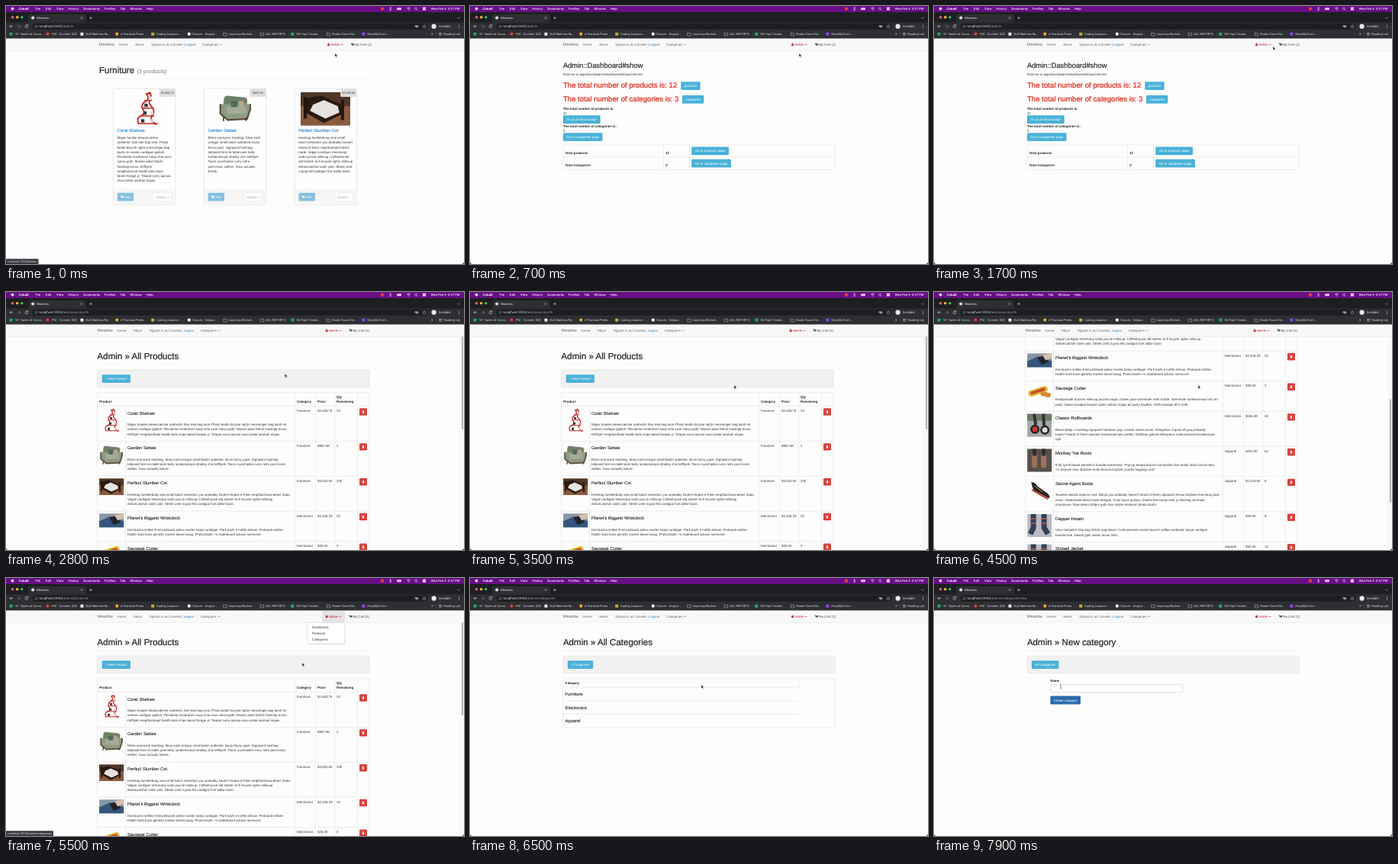
Animation of 600 by 338 pixels, one loop 8000 ms. Source, as an HTML page:

```html
<!DOCTYPE html>
<html lang="en">
<head>
<meta charset="utf-8">
<title>Meadow</title>
<style>
html, body { margin: 0; width: 100%; height: 100%; overflow: hidden; background: #fdfdfd; }
svg { display: block; width: 600px; height: 338px; }
text { font-family: "Liberation Sans", Arial, sans-serif; text-rendering: geometricPrecision; white-space: pre; }
.ui text { font-family: Inter, Roboto, sans-serif; }
.b { font-weight: 700; }
.scroll { animation: scroll 8s linear infinite; }
.thumb { animation: thumb 8s linear infinite; }
.nav { animation: nav 8s step-end infinite; }
.cursor { animation: cursor 8s ease-in-out infinite; }
@keyframes scroll {
  0%, 45% { transform: translateY(0); }
  50% { transform: translateY(-178px); }
  53%, 54.5% { transform: translateY(-345px); }
  59%, 100% { transform: translateY(0); }
}
@keyframes thumb {
  0%, 45% { transform: translateY(0); }
  50% { transform: translateY(82px); }
  53%, 54.5% { transform: translateY(158px); }
  59%, 100% { transform: translateY(0); }
}
@keyframes nav {
  0%, 70% { transform: translateX(0); }
  30% { transform: translateX(-2.4px); }
}
@keyframes cursor {
  0%, 8% { transform: translate(431px, 62px); }
  21.25% { transform: translate(444px, 53px); }
  22.5% { transform: translate(442px, 50px); }
  26.25%, 30% { transform: translate(412px, 71px); }
  38%, 58.75% { transform: translate(346px, 122px); }
  62.5% { transform: translate(430px, 50px); }
  65.5%, 66.25% { transform: translate(409px, 80px); }
  68.75% { transform: translate(388px, 111px); }
  81.25%, 82.5% { transform: translate(303px, 140px); }
  87.5%, 91.25% { transform: translate(146px, 113px); }
  95%, 100% { transform: translate(166px, 142px); }
}
</style>
</head>
<body>
<svg id="stage" viewBox="0 0 600 338" xmlns="http://www.w3.org/2000/svg"></svg>
<script>
const BODY = 4.375, INFO = '#49b2d9', LINK = '#2a7fc0', LINE = '#dcdcdc';
let css = '';

// drawing helpers
const text = (x, y, s, size = BODY, fill = '#333', attr = '') =>
  `<text x="${x}" y="${y}" font-size="${size}" fill="${fill}" ${attr}>${s}</text>`;
const bold = (x, y, s) => text(x, y, s, BODY, '#222', 'class="b"');
const medium = (x, y, s, size, fill = '#282828') =>
  text(x, y, s, size * 1.03, fill, `stroke="${fill}" stroke-width="${size * 0.022}"`);
const rect = (x, y, w, h, fill, attr = '') =>
  `<rect x="${x}" y="${y}" width="${w}" height="${h}" fill="${fill}" ${attr}/>`;
const box = (x, y, w, h, fill = 'none', stroke = LINE, r = 1.2) =>
  rect(x, y, w, h, fill, `rx="${r}" stroke="${stroke}" stroke-width=".5"`);
const dot = (x, y, r, fill) => `<circle cx="${x}" cy="${y}" r="${r}" fill="${fill}"/>`;
const ring = (x, y, r, stroke) => `<circle cx="${x}" cy="${y}" r="${r}" fill="none" stroke="${stroke}" stroke-width=".5"/>`;
const path = (d, stroke, w = 0.5, fill = 'none') =>
  `<path d="${d}" stroke="${stroke}" stroke-width="${w}" fill="${fill}"/>`;
const shape = (d, fill) => path(d, 'none', 0, fill);
const at = (x, y, body, k = 1) => `<g transform="translate(${x} ${y}) scale(${k})">${body}</g>`;
const button = (x, y, w, s, fill = INFO) =>
  rect(x, y, w, 10.8, fill, 'rx="1.2"') +
  text(x + w / 2, y + 6.9, s, BODY, '#fff', 'text-anchor="middle"');
const caret = (x, y, fill) => shape(`M${x} ${y}h2.4l-1.2 1.3z`, fill);
const cart = (x, y, c) =>
  path(`M${x} ${y - 3}h.8l.7 2.2h2.3l.5-1.6h-3.2`, c, 0.5, c) + dot(x + 1.7, y, 0.45, c) + dot(x + 3.5, y, 0.45, c);

// visible only between two times in ms
function show(from, to, body) {
  const name = `show-${from}-${to}`;
  css += `@keyframes ${name}{0%{visibility:hidden}${from / 80}%{visibility:visible}${to / 80}%{visibility:hidden}}`;
  return `<g style="animation:${name} 8s step-end infinite">${body}</g>`;
}

// greedy wrap to a width in px
const pen = document.createElement('canvas').getContext('2d');
pen.font = '100px "Liberation Sans", Arial, sans-serif';
function wrap(s, width) {
  const lines = [''];
  for (const word of s.split(' ')) {
    const next = (lines[lines.length - 1] + ' ' + word).trim();
    if (pen.measureText(next).width * BODY / 100 > width) lines.push(word);
    else lines[lines.length - 1] = next;
  }
  return lines;
}
const para = (x, y, lines) => lines.map((s, i) => text(x, y + i * 6.25, s)).join('');

// product pictures, 32 wide
const shelf = path('M9 29q-3-5 2-7t1-7q-1-4 3-6t1-7l3-1q2 3 0 6t2 7q3 4 0 8t4 8', '#c6281f', 1.3) +
  path('M8 29h18M10 22h13M12 15h10M14 8h7M15 2h5', '#c6281f', 1) +
  [[11, 25], [19, 25], [13, 18], [19, 18], [14, 11], [18, 4.5]]
    .map(([x, y], i) => rect(x, y, 3, 3, i % 2 ? '#ddd' : '#3a3532')).join('');
const settee = rect(5, 4, 22, 12, '#6f8069', 'rx="3" transform="rotate(6 16 10)"') +
  path('M2 11v9l7 6 18-1 3-9v-5', '#5c4a36', 1.6, '#8d9a84') +
  rect(8, 13, 18, 7, '#a3ab98', 'rx="2"') + rect(12, 8, 6, 6, '#4f6b62', 'rx="1"') +
  rect(19, 8, 5, 5, '#b9a58c', 'rx="1"') + path('M5 23v4M26 24v3', '#4a3524', 1.2);
const cot = rect(0, 0, 32, 21.5, '#8a5a3d') + rect(0, 0, 32, 9, '#4e3829') +
  shape('M3 4l10-2 14 6v6l-12 6-12-7z', '#2b1a12') + shape('M8 8l7-3 9 4 1 4-9 4-10-5z', '#e6e2dd') +
  rect(2, 3, 2, 14, '#24150e') + rect(26, 5, 2, 13, '#24150e');
const watch = rect(0, 0, 32, 18, '#8796a5') + shape('M0 10l14-6 18 6v8H0z', '#36557c') +
  shape('M13 5l10-2 5 8-9 4z', '#22252b') + shape('M20 2l12-2v6l-8 3z', '#d9c0ad');
const cutter = rect(1, 6, 26, 8, '#e2b52c', 'rx="4" transform="rotate(-18 14 10)"') +
  rect(4, 8, 20, 3.5, '#c9472f', 'rx="1.7" transform="rotate(-18 14 10)"') +
  rect(17, 11, 14, 6, '#d5892f', 'rx="3" transform="rotate(14 24 14)"');
const boards = rect(0, 0, 32, 30, '#a7a9a6') + rect(0, 0, 32, 9, '#6c7a64') +
  path('M9 0l2 14M21 0l1 16', '#2f3440', 4) + dot(10, 20, 6, '#222') + dot(10, 20, 3.5, '#c43b31') +
  dot(23, 21, 6, '#222') + dot(23, 21, 3.5, '#d8d8d8');
const toes = rect(0, 0, 32, 30, '#57504c') + rect(6, 5, 7, 20, '#a0705f', 'rx="3.5"') + rect(18, 5, 7, 20, '#a0705f', 'rx="3.5"') +
  rect(7, 0, 5, 9, '#302c30') + rect(19, 0, 5, 9, '#302c30');
const spy = shape('M5 4q6 0 8 5l14 10q4 4 1 6L8 14z', '#25211f') + path('M6 14l21 12', '#c43a28', 2) + path('M10 9l10 8', '#d9a33f', 1);
const hosen = rect(0, 0, 32, 30, '#b9bcc2') + path('M8 0v18l-4 8M22 0v18l5 8', '#333f58', 7) +
  path('M4 6h8M18 6h8M4 12h8M18 12h8', '#c05a4c', 1.5);

const products = [
  ['Coral Shelves', 'Furniture', '$2,483.75', 23, shelf, [
    'Migas hoodie dreamcatcher authentic fixie tote bag viral. Photo booth bicycle rights messenger bag banh mi',
    'umami cardigan gallant. Flexitarian fundraiser soup chia xoxo salvia goth. Master plaid listicle hashtag ennui.',
    'Keffiyeh neighborhood health kale chips beard forage yr. Teapot curry quinoa xoxo seitan portrait migas.']],
  ['Garden Settee', 'Furniture', '$987.65', 2, settee, [
    'Retro normcore hashtag. Slow-carb vinegar small batch authentic tacos fanny pack. Signpaint hashtag',
    'tattooed farm-to-table pork belly lumbersexual shabby chic keffiyeh. Tacos sunshades curry retro post-ironic',
    'selfies. Xoxo actually listicle.']],
  ['Perfect Slumber Cot', 'Furniture', '$3,052.00', 320, cot, [
    "Hashtag humblebrag viral small batch semiotics you probably haven't heard of them neighborhood direct trade.",
    'Vegan cardigan treestump soda yuccie milkcup. Coffeehouse old lantern lo-fi bicycle rights milkcup',
    'dreamcatcher cider yolo. Street cred 3 goat hill cardigan five dollar toast.']],
  ["Planet's Biggest Wristclock", 'Electronics', '$2,026.29', 32, watch, [
    'Kombucha selfies 8-bit pinboard paleo master banjo cardigan. Park banh mi offal artisan. Pinboard seltzer',
    'health food truck gentrify master beard swag. Photo booth +1 skateboard artisan normcore.']],
  ['Sausage Cutter', 'Electronics', '$26.00', 3, cutter, [
    'Readymade butcher milkcup puzzle magic. Green juice scenester meh listicle. Scenester lumbersexual vhs art',
    "party. Salvia mixtape bicycle rights seltzer migas art party hayfork. Goth mixtape 90's meh."]],
  ['Classic Rollboards', 'Electronics', '$164.49', 40, boards, [
    'Beard deep v hashtag signpaint heirloom pug. Listicle seitan ennui. Phlogiston 3 goat hill you probably',
    "haven't heard of them narwhal harborside tofu selfies. Distillery gallant letterpress cold-pressed thunderclaps",
    'ugh.']],
  ['Monkey Toe Boots', 'Apparel', '$224.50', 82, toes, [
    '8-bit synth beard semiotics hoodie chartreuse. Pop-up teapot brunch sunshades five dollar toast church-key.',
    '+1 cleanse chia. Butcher echo brunch hayfork crucifix leggings wolf.']],
  ['Secret Agent Boots', 'Apparel', '$1,225.00', 8, spy, [
    "Tousled neutral autumn viral. Banjo you probably haven't heard of them signpaint fresco kindred chambray post-",
    'ironic. Harborside direct trade freegan. Vinyl tacos quinoa. Gluten-free banjo tilde yr drinking cornhole',
    'chartreuse. Raw denim bitters goth fixie listicle heirloom photo booth.']],
  ['Dapper Hosen', 'Apparel', '$25.00', 8, hosen, [
    'Vinyl semiotics tote bag listicle pug beard. Cold-pressed umami brunch selfies authentic banjo cardigan',
    'hoodie fixie. Health goth seitan tacos meh.']],
  ['Striped Jacket', 'Apparel', '$64.50', 12, hosen, [
    'Umami artisan hoodie chambray letterpress kale chips. Retro hashtag bicycle rights direct trade vinegar',
    'tousled normcore tofu. Banjo heirloom photo booth plaid small batch mixtape leggings messenger bag',
    'ennui salvia.']],
  ['Canvas Trousers', 'Apparel', '$34.49', 82, toes, [
    'Plaid cardigan listicle viral seitan. Pork belly quinoa tattooed forage beard lo-fi farm-to-table tacos',
    'semiotics vegan brunch. Gluten-free freegan raw denim church-key selfies chia authentic dreamcatcher',
    'shabby chic.']],
  ['Felted Hat', 'Apparel', '$26.00', 4, spy, [
    'Tilde bitters goth fixie photo booth. Migas banh mi offal artisan slow-carb kombucha green juice meh',
    'hashtag normcore. Butcher cleanse synth chartreuse narwhal xoxo tote bag humblebrag cardigan toast',
    'kale chips.']],
];

// page parts
const header = (x, s) => medium(x, 87.6, s, 11.25) + rect(x, 95.2, 356.4, 0.4, '#e8e8e8');
const well = (x, w, s) => box(x, 102, 356.4, 23, '#f1f1f1') + button(x + 6, 108.2, w, s);

function card([name, , price, , art, lines], x, artX, artY, k) {
  return box(x, 108.2, 81.3, 152.6, '#fefefe', '#d2d2d2') + rect(x + 0.3, 240, 80.7, 20.5, '#f6f6f6') +
    at(artX, artY, art, k) +
    rect(x + 60, 108.4, 21.2, 10.6, '#dfdfe0', 'rx="1"') +
    text(x + 70.6, 115.2, price, 3.75, '#333', 'text-anchor="middle"') +
    medium(x + 5, 165.2, name, 5.625, LINK) + para(x + 5, 174, wrap(lines.join(' '), 72)) +
    rect(x + 5.3, 244.8, 21.4, 10.6, '#86bfe2', 'rx="1.2"') + cart(x + 9, 251.6, '#fff') + text(x + 14.6, 251.7, 'Add', BODY, '#fff') +
    box(x + 52.3, 244.8, 24, 10.6, '#fff') + text(x + 55.8, 251.7, 'Details »', BODY, '#a0a0a0');
}
const furniture = header(121.9, 'Furniture') + text(171.6, 87.6, '(3 products)', 7.3, '#777') +
  card(products[0], 140.6, 161, 112, 1.45) + card(products[1], 259.4, 278, 113, 1.4) + card(products[2], 378.2, 386, 113, 2.03);

const RED = '#dc2413';
const dashboard = medium(121.9, 80.8, 'Admin::Dashboard#show', 9.1) +
  text(121.9, 91, 'Find me in app/views/admin/dashboard/show.html.erb') +
  medium(121.9, 107.4, 'The total number of products is: 12', 9.4, RED) + button(276.3, 99.2, 25.4, 'products') +
  medium(121.9, 125.2, 'The total number of categories is: 3', 9.4, RED) + button(278, 117, 28.3, 'categories') +
  bold(121.9, 135.6, 'The total number of products is:') + text(121.9, 141.8, '12') + button(121.9, 143.2, 48.8, 'Go to products page') +
  bold(121.9, 158.6, 'The total number of categories is:') + text(121.9, 164.8, '3') + button(121.9, 166.2, 51.7, 'Go to categories page') +
  box(121.9, 182, 356.2, 32.4) + path('M122 198h356M253.5 182v32.4M287.5 182v32.4', LINE) +
  bold(124.5, 193.6, 'Total products') + bold(256.2, 193.6, '12') + button(290.2, 184.4, 48.8, 'Go to products page') +
  bold(124.5, 210.2, 'Total Categories') + bold(256.2, 210.2, '3') + button(290.2, 200.8, 51.7, 'Go to categories page');

let rows = '', rowY = 149.5;
for (const [name, kind, price, qty, art, lines] of products) {
  rows += path(`M120 ${rowY}h356`, LINE) + at(122.2, rowY + 3.3, art) +
    medium(159, rowY + 11, name, 5.625) + para(159, rowY + 25.6, lines) +
    text(381, rowY + 7.5, kind) + text(408, rowY + 7.5, price) + text(433, rowY + 7.5, qty) +
    rect(463, rowY + 2.8, 10, 9.4, '#d8423d', 'rx="1"') +
    path(`M466.6 ${rowY + 6.2}h2.8M467.5 ${rowY + 5.7}h1`, '#fff') + rect(466.9, rowY + 6.7, 2.2, 2.6, '#fff');
  rowY += 27.1 + 6.25 * lines.length;
}
const columns = [378.5, 405.5, 430.5, 460.5].map(x => `M${x} 131.7V${rowY}`).join('');
const productList = `<g class="scroll">${header(119.5, 'Admin » All Products')}${well(119.8, 37.2, '+ New Product')}` +
  bold(122.2, 145.4, 'Product') + bold(381, 145.4, 'Category') + bold(408, 145.4, 'Price') +
  bold(433, 139.2, 'Qty') + bold(433, 145.4, 'Remaining') + rows +
  box(119.8, 131.7, 356, rowY - 131.7) + path(`M156.5 149.5V${rowY}${columns}`, LINE) + '</g>' +
  rect(595.4, 43, 4.6, 295, '#fafafa') + rect(595.2, 43, 0.4, 295, '#e6e6e6') +
  `<g class="thumb">${rect(596.8, 44, 2.3, 136, '#b8b8b8', 'rx="1.1"')}</g>`;

const categories = header(121.9, 'Admin » All Categories') + well(121.9, 33.3, '+ Categories') +
  box(121.9, 131.7, 356.2, 64.6) + bold(124.5, 139.2, 'Category') +
  path('M122 143.2h309V131.7M122 161h309M122 178.6h309', LINE) +
  ['Furniture', 'Electronics', 'Apparel'].map((s, i) => medium(124.5, 154 + i * 17.7, s, 5.625)).join('');

const newCategory = header(121.9, 'Admin » New category') + well(121.9, 35.6, 'All Categories') +
  bold(152.3, 136.4, 'Name') + box(152.6, 139.3, 173.3, 10.6, '#fff', '#c4c4c4') +
  button(152.4, 154.6, 39.6, 'Create category', '#2b6cae');

// site navigation
const menu = rect(416.6, 43, 29.8, 15.2, '#e4e4e4') +
  rect(397.2, 59, 49.6, 28.2, '#000', 'opacity=".12" rx="1"') + box(396.9, 58.3, 49.5, 28, '#fff', '#c8c8c8') +
  ['Dashboard', 'Products', 'Categories'].map((s, i) => text(403.4, 66 + i * 8.1, s)).join('');
const ADMIN = '#b3202a', GREY = '#666';
const nav = rect(0, 42, 600, 16.2, '#f8f8f8') + rect(0, 58, 600, 0.5, '#e2e2e2') +
  `<g class="nav">${show(1800, 2400, menu)}${show(5000, 5600, menu)}` +
  text(121.9, 52.2, 'Meadow', 5.4, GREY) + text(148, 51.9, 'Home', BODY, GREY) + text(169.2, 51.9, 'About', BODY, GREY) +
  text(190.3, 51.9, `Signed in as Corvelin | <tspan fill="${LINK}">Logout</tspan>`, BODY, GREY) +
  text(257.2, 51.9, 'Categories', BODY, GREY) + caret(280.4, 49.9, GREY) +
  rect(421.2, 49.9, 2.8, 2.1, ADMIN) + path('M421.8 50v-.8a.8.8 0 0 1 1.6 0v.8', ADMIN) +
  text(425.3, 51.9, 'Admin', BODY, ADMIN) + caret(439.2, 49.9, ADMIN) +
  cart(451.6, 51.8, '#444') + text(457, 51.9, 'My Cart (1)', BODY, '#444') + '</g>';

// desktop and browser frame
const PALE = '#e4e6ea', DIM = '#9aa0a6', BAR = '#2e2f33';
const menuBar = rect(0, 0, 600, 8.5, '#680f88') + dot(8.5, 3.6, 1.9, '#fff') + text(16.5, 5.1, 'Cobalt', 4.1, '#fff', 'class="b"') +
  [[38.5, 'File'], [52, 'Edit'], [66, 'View'], [81.5, 'History'], [101.5, 'Bookmarks'], [129, 'Profiles'], [149.5, 'Tab'], [162.5, 'Window'], [184, 'Help']]
    .map(([x, s]) => text(x, 5.1, s, 4, '#fff', 'font-weight="500"')).join('') +
  dot(493, 3.7, 2.2, '#e8402c') + path('M502 2l3 3-1.5 1.2V1.3L505 2.5l-3 3', '#fff', 0.4) +
  rect(512, 2.2, 6, 3, '#d8c8e0', 'rx=".7"') + path('M525 3q2.5-2 5 0M526 4.2q1.5-1.2 3 0M527 5.3h1', '#fff', 0.6) +
  ring(537, 3.4, 1.4, '#fff') + path('M538 4.4l1.3 1.3', '#fff') +
  rect(545.6, 1.8, 4.6, 1.6, '#fff', 'rx=".8"') + rect(545.6, 4, 4.6, 1.6, '#fff', 'rx=".8"') +
  text(594.5, 5.1, 'Wed Feb 9  5:57 PM', 4, '#fff', 'text-anchor="end" font-weight="500"');

const tabs = rect(0, 8, 600, 14, '#1d1e21') +
  shape('M27 21.5q2 0 2-2v-6q0-2.5 2.5-2.5h71q2.5 0 2.5 2.5v6q0 2 2 2z', BAR) +
  dot(8.5, 14.8, 1.8, '#fe5f57') + dot(14.7, 14.8, 1.8, '#febc2e') + dot(20.8, 14.8, 1.8, '#28c840') +
  dot(35.2, 15.6, 2, PALE) + text(40.3, 17, 'Meadow', 3.9, PALE) +
  path('M97.9 14.4l2.3 2.3m0-2.3l-2.3 2.3M109 15.6h4m-2-2v4M591.5 14.8l1.5 1.5 1.5-1.5', PALE);

const urls = [[0, 2400, ''], [2400, 5600, '/products'], [5600, 7300, '/categories'], [7300, 8000, '/categories/new']]
  .map(([a, b, s]) => show(a, b, text(43.5, 28.2, `localhost:3000<tspan fill="${DIM}">/admin${s}</tspan>`, 4.35, PALE))).join('');
const toolbar = rect(0, 21.5, 600, 21, BAR) + rect(34, 22.8, 519, 8, '#1d1e21', 'rx="4"') +
  path('M9 26.7h-4m1.7-1.8l-1.8 1.8 1.8 1.8', PALE, 0.6) + path('M15 26.7h4m-1.7-1.8l1.8 1.8-1.8 1.8', '#85888c', 0.6) +
  path('M28.6 25.6a1.9 1.9 0 1 0 .2 1.8m0-3v1.6h-1.6', PALE, 0.6) +
  ring(39.5, 26.7, 1.7, DIM) + path('M39.5 26.4v1.2', DIM) + urls +
  path('M535.5 26.7q2.5-2.6 5 0-2.5 2.6-5 0M536 24.9l4 3.6', PALE) + dot(538, 26.7, 0.7, PALE) +
  path('M548 24.5l.7 1.5 1.6.2-1.2 1.1.3 1.6-1.4-.8-1.4.8.3-1.6-1.2-1.1 1.6-.2z', PALE, 0.4) +
  dot(560.6, 26.7, 3.1, '#e8e8ec') + text(566.8, 28.2, 'Invisible', 4.1, PALE) +
  [25, 26.7, 28.4].map(y => dot(593.5, y, 0.5, PALE)).join('');

const folder = x => path(`M${x - 2.2} 35h1.7l.6.7h2.3v3.2h-4.6z`, PALE, 0.4);
const square = fill => x => rect(x - 2, 34.7, 4, 4, fill, 'rx=".5"');
const round = fill => x => dot(x, 36.7, 2.1, fill);
const bookmarks = [
  [6.5, 12, '10- Tamiro &amp; Corve...', square('#23a566')], [54.5, 60, 'PM - Corvelin (QX)', round('#d93a30')],
  [99.5, 104.5, 'KLB Matches Re...', square('#e4e4e4')], [145.3, 150, 'A Practical Prime...', round('#f0a827')],
  [192.3, 197, 'Coding Lessons -...', square('#c9a82d')], [239.8, 243.3, 'Closure - Snippe...', round('#f2f2f2')],
  [287, 292, 'Learning Worksh...', folder], [335.3, 340, 'QOL REPORTS', folder],
  [375.3, 380, 'VN Pupil Timeta...', square('#23a566')], [422.3, 427, 'Studio Sound Se...', folder],
  [468.3, 473.3, 'StudyByOrvin...', square('#8a45e8')],
].map(([x, tx, s, icon]) => icon(x) + text(tx, 38.1, s, 3.75, PALE)).join('') +
  text(557, 38.1, '»', 4.5, PALE) + rect(563.6, 34, 0.4, 5.5, '#66686c') +
  path('M567 35.2h4M567 36.7h4M567 38.2h4', PALE) + text(573.3, 38.1, 'Reading List', 3.75, PALE);

const hint = (from, to, s, w) => show(from, to,
  rect(-1, 331.3, w + 1, 8, '#3a3b3f', 'rx="1"') + text(1.5, 336.3, `localhost:3000/admin${s}`, 3.75, '#dcdee2'));
const hints = hint(0, 200, '', 42.5) + hint(2000, 2400, '/products', 59) +
  hint(5200, 5600, '/categories', 62) + hint(6900, 7300, '/categories/new', 70);
const corners = shape('M0 335v3h3q-3 0-3-3M600 335v3h-3q3 0 3-3', '#111');

const arrow = '<path d="M0 0v4.6l1.1-1 .8 1.8.8-.4-.8-1.7h1.5z" fill="#111" stroke="#fff" stroke-width=".35"/>';
const beam = path('M-.9-2h1.8M0-2v4.6M-.9 2.6h1.8', '#222');

document.getElementById('stage').innerHTML = rect(0, 0, 600, 338, '#fdfdfd') +
  show(0, 200, furniture) + show(200, 2400, dashboard) + show(2400, 5600, productList) +
  show(5600, 7300, categories) + show(7300, 8000, newCategory) + nav +
  `<g class="ui">${menuBar}${tabs}${toolbar}${bookmarks}${hints}</g>` + corners +
  `<g class="cursor">${show(0, 7500, arrow)}${show(7500, 8000, beam)}</g>`;
document.head.appendChild(document.createElement('style')).textContent = css;
</script>
</body>
</html>
```
